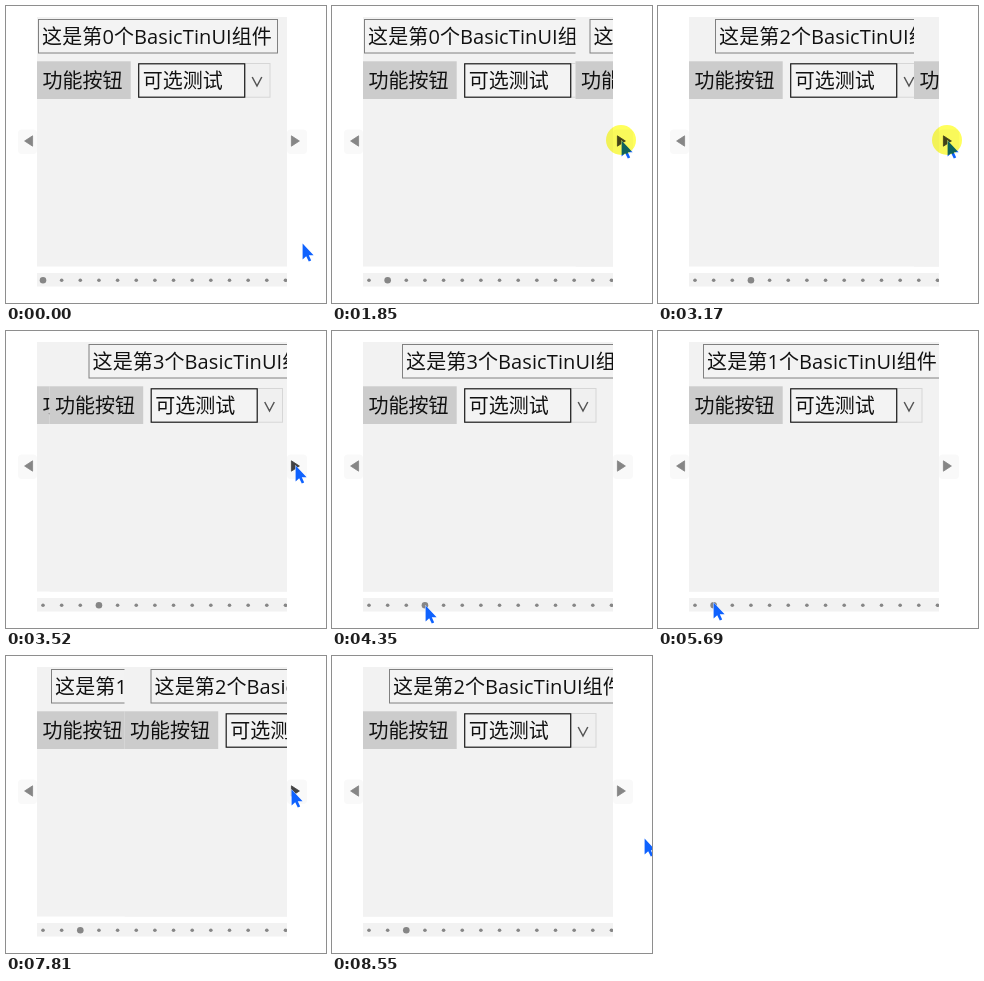
These frames come from a looping animation (320x297 px, 9.75 s). An HTML page:

```html
<!DOCTYPE html>
<html lang="zh-CN">
<head>
<meta charset="utf-8">
<title>Paged view</title>
<style>
  html, body { margin: 0; width: 100%; height: 100%; overflow: hidden; background: #fff; }
  svg { display: block; width: 320px; height: 297px; }
  text { font: 20px "Open Sans", "Noto Sans CJK SC", "Noto Sans CJK", sans-serif; fill: #111; }
  .title { letter-spacing: .1px; }
  #halo { mix-blend-mode: multiply; }
</style>
</head>
<body>
<svg viewBox="0 0 320 297">
  <defs>
    <clipPath id="view"><rect x="31" y="11" width="250" height="249.5"/></clipPath>
    <clipPath id="strip"><rect x="31" y="267" width="250" height="13.5"/></clipPath>
  </defs>
  <rect width="320" height="297" fill="#fff"/>
  <rect x="12" y="123.5" width="19" height="24.5" rx="4" fill="#f9f9f9"/>
  <rect x="281" y="123.5" width="20" height="24.5" rx="4" fill="#f9f9f9"/>
  <path d="M26.6 129.8V140.2L18.6 135Z" fill="#868686" stroke="#868686" stroke-width=".8" stroke-linejoin="round"/>
  <path id="next" d="M285.4 129.8V140.2L293.4 135Z" stroke-width=".8" stroke-linejoin="round"/>
  <g id="pages" clip-path="url(#view)"></g>
  <rect x="31" y="267" width="250" height="13.5" fill="#f2f2f2"/>
  <g id="dots" clip-path="url(#strip)" fill="#868686"></g>
  <path id="cursor" d="M.6 -.4V15.4L4.2 12.2L6.8 17.6L9.2 16.5L6.8 11.2H11.6Z"
        fill="#0f62fe" stroke="#fff" stroke-width=".8" paint-order="stroke"/>
  <circle id="halo" r="15" fill="#ffff5c"/>
</svg>
<script>
const LOOP = 9750, TICK = 66.7, WIDTH = 250, STEPS = 20, STEP_MS = 19.5, JUMP_MS = 330;
const $ = id => document.getElementById(id);

// time, page opened, slide steps already done (none: a dot click, which jumps)
const clicks = [
  { at: 1850, page: 1, done: 3 },
  { at: 2430, page: 2, done: 0 },
  { at: 3170, page: 3, done: 2 },
  { at: 5360, page: 1 },
  { at: 7600, page: 2, done: 3 }
];

// first step, last step, end point
const moves = [
  [320, 860, 289, 135],
  [3640, 4140, 129, 254],
  [4210, 4350, 93, 275],
  [4420, 4900, 55, 272],
  [6150, 6930, 284, 130],
  [7130, 7200, 285, 134],
  [8420, 8550, 322, 200]
];

const pageMarkup = i => {
  const x = 32.5 + Math.round(12.5 * i);
  return `<g>
    <rect x="31" y="11" width="250" height="250" fill="#f2f2f2"/>
    <rect x="${x}" y="13.5" width="239" height="33.5" fill="#f3f3f3" stroke="#808080"/>
    <text class="title" x="${x + 3.6}" y="38">这是第${i}个BasicTinUI组件</text>
    <rect x="31" y="55.3" width="93.7" height="37.7" fill="#ccc"/>
    <text x="36.6" y="82">功能按钮</text>
    <rect x="239" y="57.5" width="25" height="33.7" fill="#f0f0f0" stroke="#d6d6d6"/>
    <path d="M246.2 71L251 80L255.8 71" fill="none" stroke="#555" stroke-width="1.5"/>
    <rect x="132.7" y="57.8" width="106" height="33.4" fill="#f3f3f3" stroke="#1a1a1a" stroke-width="1.2"/>
    <text x="136.7" y="82">可选测试</text>
  </g>`;
};
$('pages').innerHTML = [0, 1, 2, 3].map(pageMarkup).join('');
$('dots').innerHTML = Array.from({ length: 14 }, (_, i) =>
  `<circle cx="${37 + 18.65 * i}" cy="274.3"/>`).join('');
const pages = [...$('pages').children], dots = [...$('dots').children];

const place = (node, x, y) => node.setAttribute('transform', `translate(${x} ${y})`);
const show = (node, on) => { node.style.display = on ? '' : 'none'; };

function shiftOf(click, age) {
  if (click.done === undefined) return age < JUMP_MS ? WIDTH : 0;
  const seen = Math.floor(age / TICK) * TICK;
  const step = click.done + Math.floor(seen / STEP_MS);
  return WIDTH * (1 - Math.min(1, step / STEPS));
}

function cursorAt(t) {
  let x = 296, y = 238;
  for (const [a, b, toX, toY] of moves) {
    if (t < a) break;
    const count = Math.round((b - a) / TICK) + 1;
    const p = Math.min(1, (Math.floor((t - a) / TICK) + 1) / count);
    const ease = p * p * (3 - 2 * p);
    x += (toX - x) * ease;
    y += (toY - y) * ease;
  }
  return [Math.round(x), Math.round(y)];
}

function draw(t) {
  const past = clicks.filter(c => c.at <= t);
  const last = past.pop(), before = past.pop();
  const from = before ? before.page : 0;
  const to = last ? last.page : 0;
  const age = last ? t - last.at : Infinity;
  const shift = last ? shiftOf(last, age) : 0;
  pages.forEach((page, i) => {
    show(page, i === from || i === to);
    place(page, i === to ? shift : 0, 0);
  });
  // the incoming page lies over the one it replaces
  if (pages[to] !== $('pages').lastChild) $('pages').append(pages[to]);

  const [x, y] = cursorAt(t);
  place($('cursor'), x, y);
  dots.forEach((dot, i) => {
    const near = Math.hypot(x - 37 - 18.65 * i, y - 274) < 3;
    dot.setAttribute('r', i === to || near ? 3.3 : 1.8);
  });

  // the arrow darkens under the pointer and resets some time after a press
  const over = x > 283 && x < 300 && y < 142;
  const fresh = !last || last.done === undefined || age < 520;
  const ink = over && fresh ? '#424242' : '#868686';
  $('next').setAttribute('fill', ink);
  $('next').setAttribute('stroke', ink);

  show($('halo'), age < 70);
  place($('halo'), x, y - (y < 142 ? 1 : 0));
}

const began = performance.now();
function loop() {
  draw((performance.now() - began) % LOOP);
  requestAnimationFrame(loop);
}
loop();
</script>
</body>
</html>
```
